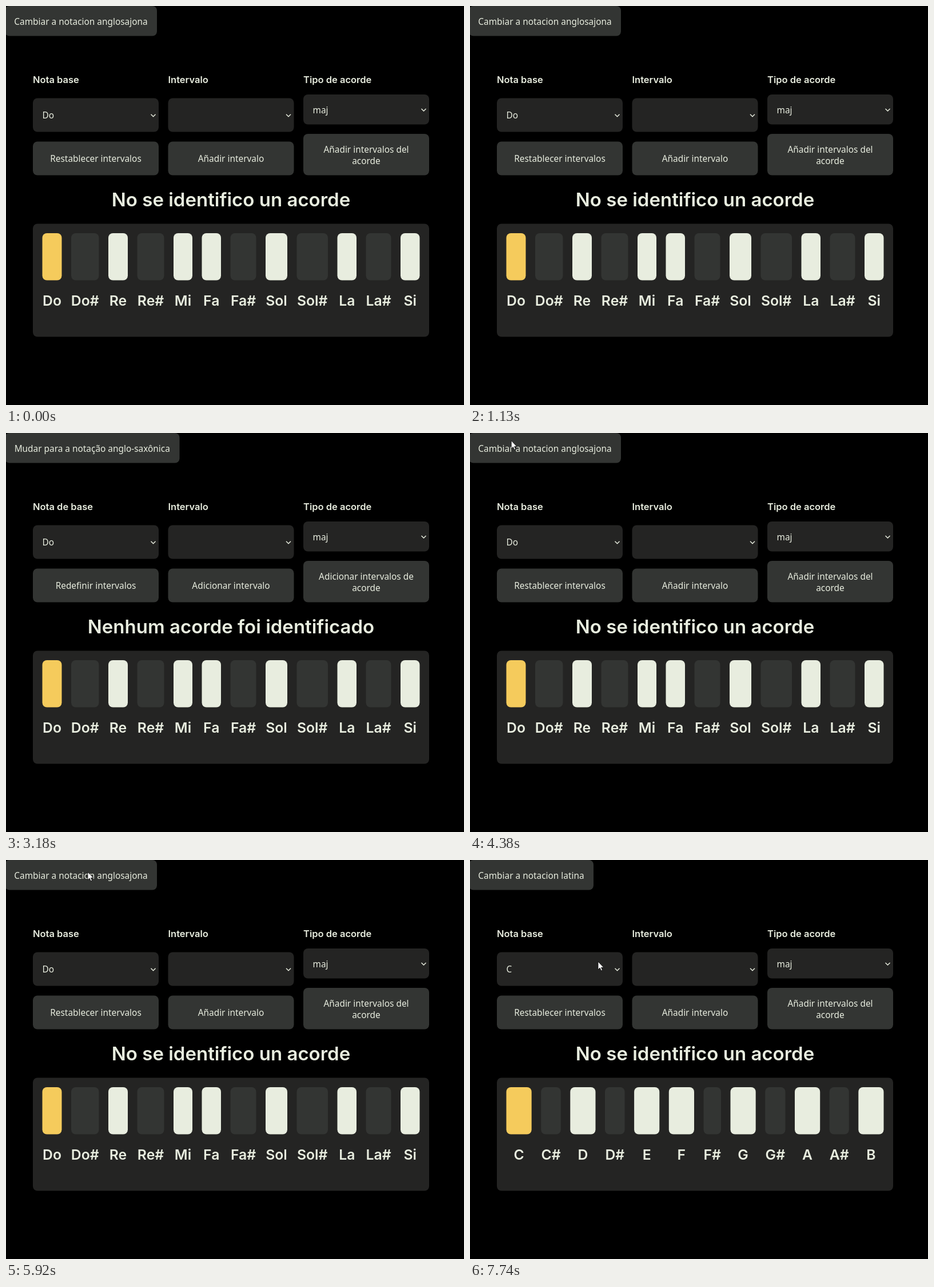
Write an HTML page that moves like this. It is 801 by 699 pixels and loops after 8 s.

```html
<!DOCTYPE html>
<html lang="es">
<head>
<meta charset="utf-8">
<title>Acordes</title>
<style>
  html, body { margin: 0; width: 100%; height: 100%; overflow: hidden; background: #000; }
  svg { display: block; }
  text { fill: #e8eddf; font: 15.4px "Noto Sans", sans-serif; }
  .label { font: 600 16.5px Inter, sans-serif; }
  .title { font: 600 33px Inter, sans-serif; }
  .note { font: 600 24.75px Inter, sans-serif; }
  .mid { text-anchor: middle; }
  .chevron { fill: none; stroke: #e8eddf; stroke-width: 1.5; }
</style>
</head>
<body>
<svg width="801" height="699" viewBox="0 0 801 699">
  <g id="page"></g>
  <path id="cursor" d="M0 0V14L3.2 11L5.3 16L7.6 15L5.5 10.3H9.8Z" fill="#fff" stroke="#000" stroke-width=".8"/>
  <circle id="click" cx="141.5" cy="21.5" r="12.5" fill="#ff0" fill-opacity=".47"/>
</svg>
<script>
const LOOP = 8000;
const PANEL = '#242423', BUTTON = '#333533', LIGHT = '#e8eddf', ACCENT = '#f5cb5c';
const COLUMNS = [47, 283.5, 520], COLUMN_WIDTH = 220, GAP = 16.5;

const LANGUAGES = {
  es: {
    toggle: { latin: ['Cambiar a notacion anglosajona', 264], anglo: ['Cambiar a notacion latina', 216] },
    labels: ['Nota base', 'Intervalo', 'Tipo de acorde'],
    buttons: [['Restablecer intervalos'], ['Añadir intervalo'], ['Añadir intervalos del', 'acorde']],
    title: 'No se identifico un acorde'
  },
  en: {
    toggle: { latin: ['Change to anglo-saxon notation', 263] },
    labels: ['Base note', 'Interval', 'Chord type'],
    buttons: [['Reset intervals'], ['Add interval'], ['Add chord intervals']],
    title: 'No chord was identified'
  },
  pt: {
    toggle: { latin: ['Mudar para a notação anglo-saxônica', 303.5] },
    labels: ['Nota de base', 'Intervalo', 'Tipo de acorde'],
    buttons: [['Redefinir intervalos'], ['Adicionar intervalo'], ['Adicionar intervalos de', 'acorde']],
    title: 'Nenhum acorde foi identificado'
  }
};

const NOTATIONS = {
  latin: {
    names: ['Do', 'Do#', 'Re', 'Re#', 'Mi', 'Fa', 'Fa#', 'Sol', 'Sol#', 'La', 'La#', 'Si'],
    widths: [34, 48.5, 34, 47, 33, 33.5, 45, 38, 54.5, 33.5, 44, 33.5]
  },
  anglo: {
    names: ['C', 'C#', 'D', 'D#', 'E', 'F', 'F#', 'G', 'G#', 'A', 'A#', 'B'],
    widths: [44.2, 34.6, 44.2, 34.6, 44.2, 44.2, 30.5, 44.2, 35.3, 44.2, 34.1, 44.2]
  }
};

const STATES = [
  [0, 'es', 'latin'], [2180, 'en', 'latin'], [3180, 'pt', 'latin'], [4040, 'es', 'latin'],
  [5250, 'es', 'anglo'], [5920, 'es', 'latin'], [6670, 'es', 'anglo']
];
const CLICKS = [[4980, 5250], [5660, 5920], [6400, 6600]];

// Each move advances in `steps` even jumps; `lead` means the first jump already leaves the start point.
const MOVES = [
  { start: 250, end: 530, steps: 5, lead: 0, points: [[688, 668], [355, 468]], ease: u => u * (2 - u) },
  { start: 790, end: 1060, steps: 5, lead: 1, points: [[355, 468], [7, 161]], ease: u => u },
  { start: 4310, end: 4720, steps: 7, lead: 0, points: [[41, 10], [143, 21]], ease: u => u * (2 - u) },
  { start: 7200, end: 7740, steps: 9, lead: 1, points: [[143, 21], [258, 264], [224, 178]], ease: u => u }
];

const rect = (x, y, w, h, fill) =>
  `<rect x="${x}" y="${y}" width="${w}" height="${h}" rx="8" fill="${fill}"/>`;
const text = (x, y, content, cls = '') => `<text x="${x}" y="${y}" class="${cls}">${content}</text>`;

function drawColumn(i, lang, notation) {
  const x = COLUMNS[i], lines = lang.buttons[i];
  const tallRow = lang.buttons[2].length > 1;
  const stretched = tallRow && i < 2;
  const selectY = stretched ? 161.5 : 155, selectH = stretched ? 59 : 52.5;
  const buttonY = stretched ? 237.5 : 224;
  const buttonH = (tallRow ? 296.5 : 276.5) - buttonY;
  const middle = selectY + selectH / 2;
  const value = [NOTATIONS[notation].names[0], '', 'maj'][i];
  const firstLine = stretched ? 273.3 : 256.8;
  return text(x, 134.5, lang.labels[i], 'label')
    + rect(x, selectY, COLUMN_WIDTH, selectH, PANEL)
    + text(x + GAP, middle + 6.3, value)
    + `<path class="chevron" d="M${x + 206.5} ${middle - 1.2}l4 4l4 -4"/>`
    + rect(x, buttonY, COLUMN_WIDTH, buttonH, BUTTON)
    + lines.map((line, n) => text(x + COLUMN_WIDTH / 2, firstLine + n * 20, line, 'mid')).join('');
}

function drawKeys({ names, widths }, top) {
  let x = 63.5;
  return names.map((name, i) => {
    const w = widths[i];
    const fill = i === 0 ? ACCENT : name.endsWith('#') ? BUTTON : LIGHT;
    const key = rect(x, top + 16.5, w, 82.5, fill) + text(x + w / 2, top + 143, name, 'note mid');
    x += w + GAP;
    return key;
  }).join('');
}

function drawPage(langName, notation) {
  const lang = LANGUAGES[langName];
  const [toggle, right] = lang.toggle[notation];
  const top = lang.buttons[2].length > 1 ? 381.5 : 361.8;
  return rect(-2, 0, right + 2, 52.5, BUTTON)
    + text((right - 2) / 2, 32.8, toggle, 'mid')
    + COLUMNS.map((_, i) => drawColumn(i, lang, notation)).join('')
    + text(393.5, top - 30.2, lang.title, 'title mid')
    + rect(47, top, 693, 198, PANEL)
    + drawKeys(NOTATIONS[notation], top);
}

function cursorAt(t) {
  const { start, end, steps, lead, points, ease } = MOVES.findLast(m => t >= m.start);
  const interval = (end - start) / (steps - 1);
  const step = Math.min(steps - 1, Math.floor((t - start) / interval + 1e-6));
  const along = ease((step + lead) / (steps - 1 + lead)) * (points.length - 1);
  const leg = Math.min(points.length - 2, Math.floor(along));
  return points[leg].map((v, axis) => v + (points[leg + 1][axis] - v) * (along - leg));
}

const page = document.getElementById('page');
const cursor = document.getElementById('cursor');
const click = document.getElementById('click');
const show = (el, visible) => el.setAttribute('visibility', visible ? 'visible' : 'hidden');
let current;

function frame() {
  const t = performance.now() % LOOP;
  const state = STATES.findLast(s => t >= s[0]);
  if (state !== current) {
    current = state;
    page.innerHTML = drawPage(state[1], state[2]);
  }
  const pointing = (t >= 250 && t < 1130) || t >= 4310;
  show(cursor, pointing);
  if (pointing) cursor.setAttribute('transform', `translate(${cursorAt(t)})`);
  show(click, CLICKS.some(([from, to]) => t >= from && t < to));
  requestAnimationFrame(frame);
}
frame();
</script>
</body>
</html>
```
